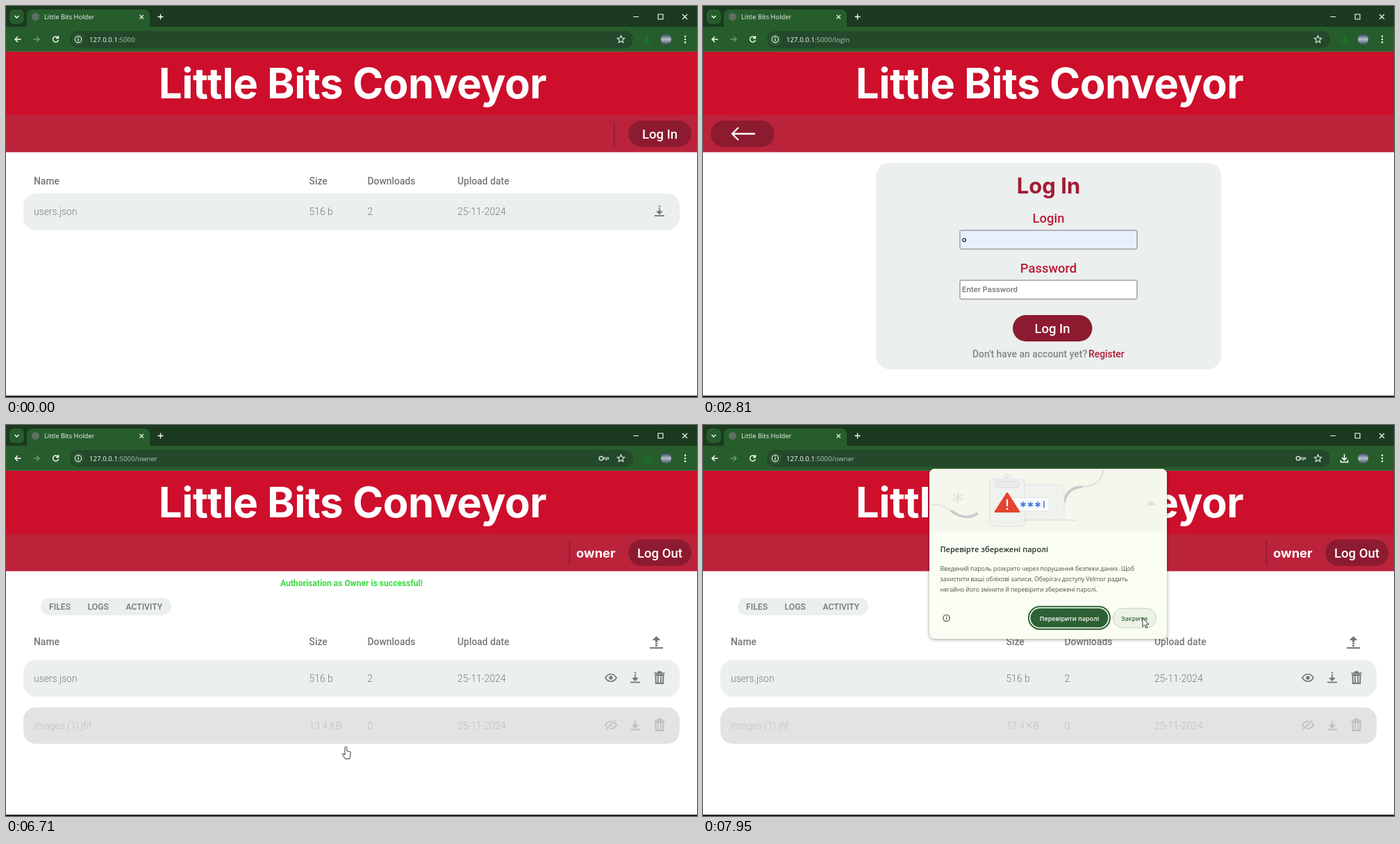
These frames come from a looping animation (995 px wide and 563 px high, 8000 ms). An HTML page with a canvas:

```html
<!DOCTYPE html>
<html lang="en">
<head>
<meta charset="utf-8">
<title>Little Bits Holder</title>
<style>
html, body { margin: 0; width: 100%; height: 100%; overflow: hidden; background: #fff; }
canvas { display: block; }
</style>
</head>
<body>
<canvas id="stage" width="995" height="563"></canvas>
<script>
const ctx = document.getElementById('stage').getContext('2d');
const LOOP = 8000;
const TICK = 79;
const ROBOTO = 'Roboto, sans-serif';
const HEADING = 'Inter, sans-serif';
const SYSTEM = '"Open Sans", sans-serif';
const CARD = '#ebefee', WINE = '#8d1b30', GREY = '#777';
const LOGIN_AT = 1620, OWNER_AT = 6710, DIALOG_AT = 7090;

function box(x, y, w, h, r, fill, stroke, lw = 1) {
  ctx.beginPath();
  ctx.roundRect(x, y, w, h, r);
  if (fill) { ctx.fillStyle = fill; ctx.fill(); }
  if (stroke) { ctx.strokeStyle = stroke; ctx.lineWidth = lw; ctx.stroke(); }
}
function disc(x, y, r, fill, stroke, lw = 1) {
  box(x - r, y - r, 2 * r, 2 * r, r, fill, stroke, lw);
}
function line(d, color, lw = 1) {
  ctx.strokeStyle = color;
  ctx.lineWidth = lw;
  ctx.stroke(new Path2D(d));
}
function shape(d, color) {
  ctx.fillStyle = color;
  ctx.fill(new Path2D(d));
}
function text(s, x, y, size, color, { weight = 500, family = ROBOTO, align = 'left', spacing = 0 } = {}) {
  ctx.font = `${weight} ${size}px ${family}`;
  ctx.letterSpacing = spacing + 'px';
  ctx.fillStyle = color;
  ctx.textAlign = align;
  ctx.fillText(s, x, y);
  return ctx.measureText(s).width;
}
function at(x, y, draw) {
  ctx.save();
  ctx.translate(x, y);
  draw();
  ctx.restore();
}

// Last value whose start time has passed.
function latest(t, steps, initial) {
  return steps.reduce((value, [start, next]) => t >= start ? next : value, initial);
}
function glide(t, start, end, from, to) {
  const n = Math.round((end - start) / TICK) + 1;
  const k = Math.min(1, (Math.floor((t - start + 4) / TICK) + 1) / n);
  const e = k * k * (3 - 2 * k);
  return from.map((v, i) => v + (to[i] - v) * e);
}

function downloadIcon(x, y, color) {
  at(x, y, () => {
    line('M0-8V-6.5M0-5V-3.5', color, 2.6);
    shape('M-1.3-2.5H1.3V0H5L0 5L-5 0H-1.3Z', color);
    line('M-7 6.5H7', color, 1.8);
  });
}
function uploadIcon(x, y, color) {
  at(x, y, () => {
    shape('M0-9L6-3H1.7V0H-1.7V-3H-6Z', color);
    line('M0 1V3M0 4V6', color, 3.4);
    line('M-9.5 8H9.5', color, 2);
  });
}
function eyeIcon(x, y, color, hidden) {
  at(x, y, () => {
    line('M-8 0C-4-7 4-7 8 0C4 7-4 7-8 0Z', color, 1.7);
    disc(0, 0, 2.7, color);
    if (hidden) {
      line('M-6 7L6-7', '#e2e4e3', 4);
      line('M-7 6.5L6.5-7', color, 1.6);
    }
  });
}
function trashIcon(x, y, color) {
  at(x, y, () => {
    line('M-7.5-6.5H7.5M-3-8.5H3', color, 2);
    line('M-5.5-4L-5 8H5L5.5-4Z', color, 2);
    line('M-2-3V7M2-3V7', color, 1.7);
  });
}

function browser(t) {
  ctx.fillStyle = '#1b3a1f';
  ctx.fillRect(0, 0, 995, 31);
  ctx.fillStyle = '#275d2c';
  ctx.fillRect(0, 30, 995, 36);
  box(5, 5, 21, 21, 7, '#275d2c');
  line('M12.5 14L15.5 17L18.5 14', '#fff', 1.4);
  box(30, 5, 177, 27, [8, 8, 0, 0], '#275d2c');
  disc(42.5, 15.5, 5.5, '#5d6f61');
  text('Little Bits Holder', 55, 19, 9.4, '#f2f7f2', { weight: 400, family: SYSTEM });
  line('M192.5 13L198 18.5M198 13L192.5 18.5', '#e8f0e8', 1.2);
  line('M218.5 15.5H226.5M222.5 11.5V19.5', '#fff', 1.3);
  line('M903.5 15.5H911M939 12H946V19H939ZM974 12L981 19M981 12L974 19', '#fff', 1.1);

  line('M21.5 48H13M17 44L13 48L17 52', '#fff', 1.4);
  line('M39.5 48H48M44 44L48 48L44 52', '#6f9b72', 1.3);
  line('M74.8 45.5A4 4 0 1 0 75.5 49M75.5 43V46.5H72', '#fff', 1.4);
  box(92, 36, 811, 24.5, 12, '#24482a');
  disc(104, 48, 9, '#2b5631');
  disc(104, 48, 4.6, null, '#e4ede5', 1.1);
  line('M104 47.3V50.5M104 45.2V46.4', '#fff', 1.2);
  const address = { weight: 400, family: SYSTEM };
  const hostWidth = text('127.0.0.1', 120, 51.5, 9.7, '#fff', address);
  const path = latest(t, [[LOGIN_AT, '/login'], [OWNER_AT, '/owner']], '');
  text(':5000' + path, 120 + hostWidth, 51.5, 9.7, '#b3c6b5', address);
  if (t >= 4680) {
    disc(857, 48, 2.8, null, '#d5e2d6', 1.5);
    line('M860 47H867.5V49H860M864.5 49V51', '#d5e2d6', 1.2);
  }
  line('M885.5 42.7L887 46.1L890.7 46.5L887.9 49L888.7 52.6L885.5 50.7L882.3 52.6L883.1 49L880.3 46.5L884 46.1Z', '#e5eee5', 1.1);
  line('M923.5 42V50M920 47L923.5 50.5L927 47M918.5 50.5V53.5H928.5V50.5', t >= 7330 ? '#fff' : '#147a2c', 1.6);
  const avatar = ctx.createLinearGradient(0, 40, 0, 56);
  avatar.addColorStop(0, '#2b3d58');
  avatar.addColorStop(.5, '#b4bdcb');
  avatar.addColorStop(1, '#37465a');
  disc(950.5, 48, 7.5, avatar);
  for (const y of [43.7, 48, 52.3]) disc(978, y, 1.25, '#fff');
}

function siteHeader() {
  ctx.fillStyle = '#cd0f2c';
  ctx.fillRect(0, 66, 995, 91);
  ctx.fillStyle = '#bb233b';
  ctx.fillRect(0, 157, 995, 53.5);
  ctx.fillStyle = '#4d6b48';
  ctx.fillRect(0, 65, 995, 1);
  text('Little Bits Conveyor', 499, 133, 60, '#fff', { weight: 700, family: HEADING, align: 'center', spacing: -.5 });
}
function cornerButton(label, dividerX) {
  line(`M${dividerX} 167V202`, '#961d32', 2);
  box(896, 165, 91, 38, 19, WINE);
  text(label, 941.5, 191, 18.5, '#fff', { align: 'center' });
}
function tableHead(y) {
  [['Name', 40], ['Size', 436.5], ['Downloads', 520.5], ['Upload date', 650]]
    .forEach(([s, x]) => text(s, x, y, 13.9, GREY));
}
function tableRow(top, height, cells, fill, color) {
  box(25, top, 945, height, 18, fill);
  [40, 436.5, 520.5, 650].forEach((x, i) => text(cells[i], x, top + height / 2 + 5, 13.9, color, { weight: 300 }));
}
const USERS = ['users.json', '516 b', '2', '25-11-2024'];
const IMAGES = ['images (1).jfif', '13.4 KB', '0', '25-11-2024'];

function homePage() {
  cornerButton('Log In', 876);
  tableHead(256.5);
  tableRow(270, 52.5, USERS, CARD, '#7b7b7b');
  downloadIcon(941, 295.5, GREY);
}

function field(y, value, placeholder, fill, border) {
  box(370, y + .5, 255, 27, 1.5, fill, border);
  if (value) text(value, 373, y + 17.3, 11.4, '#1c1c24');
  else if (placeholder) text(placeholder, 373, y + 17.3, 11.4, GREY);
}
function caret(x, y) {
  line(`M${x + .5} ${y + 6}V${y + 21}`, '#222', 1);
}
function loginPage(t) {
  box(11, 165, 92, 38, 19, WINE);
  line('M75 184H42M51 175L42 184L51 193', '#fff', 2.3);
  box(249, 226, 497.5, 297, 20, CARD);
  text('Log In', 497.5, 270, 31, '#a31b33', { weight: 700, family: HEADING, align: 'center' });
  text('Login', 497.5, 312, 18.4, '#bb1c37', { align: 'center' });
  text('Password', 497.5, 384, 18.4, '#bb1c37', { align: 'center' });

  const login = latest(t, [[2740, 'o'], [2980, 'owne'], [3220, 'owner']], '');
  const dots = latest(t, [[4680, 1], [4840, 2], [5250, 3], [5500, 4], [5660, 5]], 0);
  const loginActive = t >= 2250 && t < 2740;
  field(322.5, login, 'Enter Login', t >= 2810 ? '#e8f0fe' : '#fff', loginActive ? '#555' : '#777');
  field(394.5, '', dots ? '' : 'Enter Password', '#fff', '#777');
  for (let i = 0; i < dots; i++) disc(375.3 + 3.9 * i, 408.7, 1.45, '#222');
  if (loginActive) caret(373, 322.5);
  if (t >= 3290 && t < 3780) caret(404, 322.5);
  if (t >= 4110) caret(dots ? 372.5 + 4 * dots : 373, 394.5);

  box(446, 445, 114.5, 38, 19, WINE);
  text('Log In', 503, 471, 18.5, '#fff', { align: 'center' });
  text("Don't have an account yet?", 388, 506, 13.9, '#858585');
  text('Register', 555, 506, 13.9, '#b01b35');
}

function ownerPage() {
  cornerButton('Log Out', 811.5);
  text('owner', 821, 190.5, 18.4, '#fff', { weight: 700, family: HEADING });
  text('Authorisation as Owner is successful!', 497.5, 232, 12.1, '#39da3e', { weight: 700, align: 'center' });
  box(50, 249, 188, 25, 12.5, CARD);
  [['FILES', 62], ['LOGS', 117.5], ['ACTIVITY', 172.5]].forEach(([s, x]) => text(s, x, 265.5, 12.2, GREY));
  tableHead(316.5);
  uploadIcon(936.5, 313, GREY);
  [[338.5, USERS, CARD, '#7b7b7b', GREY], [406.5, IMAGES, '#e2e4e3', '#bfc1c1', '#bdbfbf']]
    .forEach(([top, cells, fill, color, iconColor], i) => {
      tableRow(top, 52.5, cells, fill, color);
      eyeIcon(871, top + 25.5, iconColor, i === 1);
      downloadIcon(906, top + 25.5, iconColor);
      trashIcon(941, top + 25.5, iconColor);
    });
}

function asterisk(x, y, r, color, lw) {
  at(x, y, () => {
    for (let i = 0; i < 3; i++) {
      line(`M0 ${-r}V${r}`, color, lw);
      ctx.rotate(Math.PI / 3);
    }
  });
}
function dialogArt() {
  box(326, 63, 342, 90.5, [8, 8, 0, 0], '#f5f7ed');
  line('M327 115C341 112 347 117 357 123', '#e6e8e5', 3);
  line('M357 123C370 134 384 135 396 127', '#c9cccb', 4);
  line('M520 112C522 98 530 90 546 89', '#c9cccb', 4);
  line('M546 89C565 88 575 80 576 64', '#e3e5e3', 3);
  asterisk(367, 104, 8, '#e1e3e2', 2.5);
  shape('M639 116A6 6 0 0 1 651 116Z', '#e1e3e2');
  box(462, 86, 58, 50, 4, '#f0f2ee', '#dfe2e2');
  line('M464 137H538', '#dfe2e2', 1.5);
  box(412.5, 78, 51, 68, 6, '#f0f2f0', '#dde0e1');
  box(421, 81, 34, 9, 3, '#e8eaeb', '#d9dcde');
  disc(438, 76, 5, '#eef0ef', '#d9dcde');
  disc(438, 76, 1.8, '#d9dcde');
  box(440, 104.5, 59, 19.5, 3, '#fafbfa', '#dfe2e5');
  for (const x of [461, 471.5, 482]) asterisk(x, 114.5, 4, '#3978e0', 1.6);
  line('M491 109.5V119.5', '#3978e0', 1.5);
  shape('M438 97Q439 97 440 99L456 124Q457 126 455 126H421Q419 126 420 124L436 99Q437 97 438 97Z', '#e5432f');
  line('M438 107V117M438 119.5V122', '#fff', 2.3);
}
function dialog(t) {
  ctx.save();
  ctx.globalAlpha = latest(t, [[7170, .75], [7240, 1]], .35);
  ctx.shadowColor = 'rgba(0,0,0,.38)';
  ctx.shadowBlur = 5;
  ctx.shadowOffsetY = 1;
  box(326, 63, 342, 245, 8, '#fafdf2');
  ctx.shadowColor = 'transparent';
  dialogArt();
  const ui = { weight: 600, family: SYSTEM };
  text('Перевірте збережені паролі', 341.5, 182.5, 11, '#26302a', ui);
  ['Введений пароль розкрито через порушення безпеки даних. Щоб',
    'захистити ваші облікові записи, Оберігач доступу Velmor радить',
    'негайно його змінити й перевірити збережені паролі.']
    .forEach((s, i) => text(s, 341.5, 210 + 15.2 * i, 8.6, '#4a514b', { weight: 400, family: SYSTEM }));
  disc(350.5, 278, 4.7, null, '#444d46', 1.1);
  line('M350.5 277V280.5M350.5 275V276.2', '#444d46', 1.1);
  box(469, 261.5, 117, 32.5, 16, '#fafdf2', '#2d6134', 2);
  box(471.5, 264, 112, 27.5, 14, '#2d6134');
  text('Перевірити паролі', 527.5, 281.5, 9, '#fff', { ...ui, align: 'center' });
  box(590.5, 264, 62, 28, 14, t >= 7870 ? '#edf2e6' : '#fafdf2', '#bcd8b9');
  text('Закрити', 621, 281.5, 9, '#3d6f42', { ...ui, align: 'center' });
  ctx.restore();
}

const POINTERS = {
  hand: 'M-1.5 1.3C-1.5-.4 1.3-.4 1.3 1.3V6.3L5.4 7.3Q7 7.8 6.8 9.5L6 14.2L5.1 17.8H-1.2L-5 11.2Q-5.3 9.8-3.9 9.9L-1.5 12Z',
  arrow: 'M0 0V12.5L2.9 9.8L4.9 14.2L7 13.3L5.1 9H9Z'
};
function pointer(kind, x, y) {
  at(x, y, () => {
    if (kind === 'beam') {
      line('M-3-7H3M0-7V7M-3 7H3', '#333', 1.1);
      return;
    }
    shape(POINTERS[kind], '#fff');
    line(POINTERS[kind], '#222', .9);
  });
}
function mouse(t) {
  const button = [930, 185.5], loginField = [500, 337], passField = [498, 409], submit = [489.5, 463];
  let kind = 'hand', p;
  if (t < 160) return;
  if (t < 1700) {
    p = glide(t, 160, 800, [941, 297], button);
    kind = p[1] < 203 || p[1] > 280 ? 'hand' : 'arrow';
  } else if (t < 2740) {
    p = glide(t, 1700, 2000, button, loginField);
    kind = t >= 2000 ? 'beam' : 'arrow';
  } else if (t < 3460) return;
  else if (t < 4680) {
    p = t < 3530 ? [498, 383] : passField;
    kind = 'beam';
  } else if (t < 5660) return;
  else if (t < 7480) {
    p = glide(t, 5660, 6210, passField, submit);
    kind = p[1] < 422 ? 'beam' : p[1] < 445 ? 'arrow' : 'hand';
  } else {
    p = glide(t, 7480, 7950, submit, [633, 278]);
    kind = 'arrow';
  }
  pointer(kind, ...p);
}

function render(t) {
  ctx.fillStyle = '#fff';
  ctx.fillRect(0, 0, 995, 563);
  browser(t);
  siteHeader();
  if (t < LOGIN_AT) homePage();
  else if (t < OWNER_AT) loginPage(t);
  else ownerPage();
  ctx.fillStyle = '#20231f';
  ctx.fillRect(0, 561, 995, 2);
  if (t >= DIALOG_AT) dialog(t);
  mouse(t);
}

const began = performance.now();
function frame() {
  render((performance.now() - began) % LOOP);
  requestAnimationFrame(frame);
}
frame();
</script>
</body>
</html>
```
